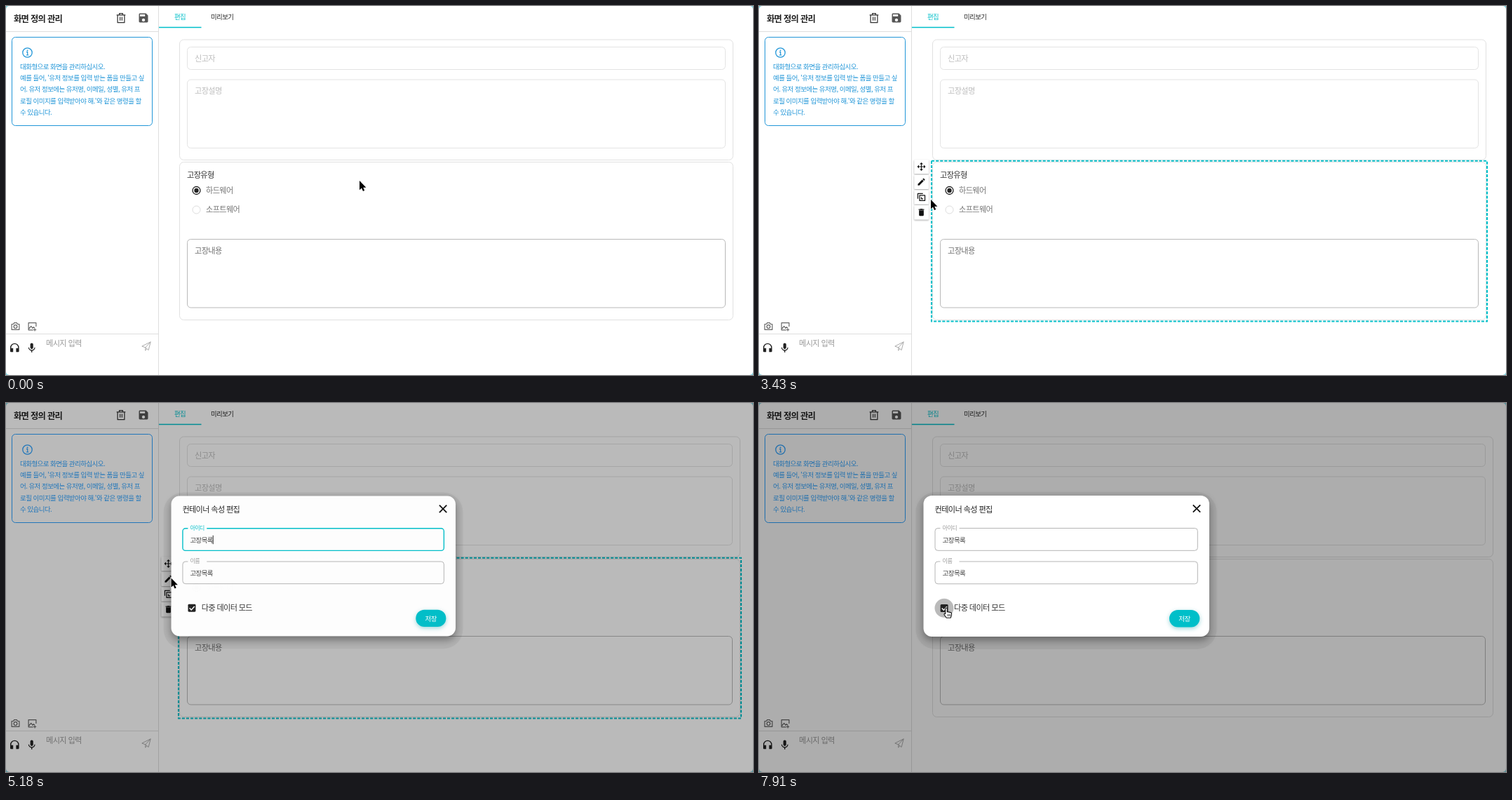
Recreate the animation shown at these times as an HTML page. Size 1065 by 526 pixels, loop 8000 ms.

```html
<!DOCTYPE html>
<html lang="ko">
<head>
<meta charset="utf-8">
<style>
  html, body { margin: 0; width: 100%; height: 100%; overflow: hidden; }
  svg { display: block; width: 100vw; height: 100vh; font-family: 'Noto Sans CJK KR', 'Noto Sans CJK', sans-serif; }
  text { letter-spacing: -.057em; white-space: pre; }
  .button { filter: drop-shadow(0 1px 1px rgba(0,0,0,.35)); }
  .panel { filter: drop-shadow(0 5px 6px rgba(0,0,0,.38)); }
  .save { filter: drop-shadow(0 2px 3px rgba(0,150,160,.4)); }
</style>
</head>
<body>
<svg id="stage" viewBox="0 0 1065 526" preserveAspectRatio="none"></svg>
<script>
const stage = document.getElementById('stage');
const LOOP = 8000, STEP = 70;
const TEAL = '#00bfc9', BLUE = '#2196d8', BRIGHT_BLUE = '#2ea2ff';

// Icons live on a 24-unit grid; those in `outlined` are stroked instead of filled.
const icons = {
  trash: 'M3 6h18M8.5 6V3h7v3M5 6v15.5h14V6M10 10v7.5M14 10v7.5',
  disk: 'M17 3H5c-1.1 0-2 .9-2 2v14c0 1.1.9 2 2 2h14c1.1 0 2-.9 2-2V7l-4-4zm-5 16c-1.66 0-3-1.34-3-3s1.34-3 3-3 3 1.34 3 3-1.34 3-3 3zm3-10H5V5h10v4z',
  bin: 'M6 19c0 1.1.9 2 2 2h8c1.1 0 2-.9 2-2V7H6v12zM19 4h-3.5l-1-1h-5l-1 1H5v2h14V4z',
  pencil: 'M3 17.25V21h3.75L17.81 9.94l-3.75-3.75L3 17.25zM20.71 7.04c.39-.39.39-1.02 0-1.41l-2.34-2.34c-.39-.39-1.02-.39-1.41 0l-1.83 1.83 3.75 3.75 1.83-1.83z',
  move: 'M13 6v5h5V7.75L22.25 12 18 16.25V13h-5v5h3.25L12 22.25 7.75 18H11v-5H6v3.25L1.75 12 6 7.75V11h5V6H7.75L12 1.75 16.25 6z',
  mic: 'M12 14c1.66 0 3-1.34 3-3V5c0-1.66-1.34-3-3-3S9 3.34 9 5v6c0 1.66 1.34 3 3 3zm5.3-3c0 3-2.54 5.1-5.3 5.1S6.7 14 6.7 11H5c0 3.41 2.72 6.23 6 6.72V21h2v-3.28c3.28-.48 6-3.3 6-6.72z',
  phones: 'M12 3a9 9 0 0 0-9 9v7c0 1.1.9 2 2 2h4v-8H5v-1a7 7 0 0 1 14 0v1h-4v8h4c1.1 0 2-.9 2-2v-7a9 9 0 0 0-9-9z',
  copy: 'M16 3H3v13M7.5 7.5H21V21H7.5zM12 12v4.5h4.5',
  camera: 'M3 7h4l2-3h6l2 3h4v13H3zM16 13a4 4 0 1 1-8 0 4 4 0 0 1 8 0z',
  picture: 'M21 12V3H3v17h11M4 17l5-6 4 5 2-3 3 3M18 16v7M14.5 19.5h7',
  plane: 'M2 12L22 2 17 21 10 15zM10 15v7l3-4M22 2L10 15'
};
const outlined = ['trash', 'copy', 'camera', 'picture', 'plane'];

const icon = (name, cx, cy, scale, color, weight = 2) => {
  const paint = outlined.includes(name)
    ? `fill="none" stroke="${color}" stroke-width="${weight}" stroke-linejoin="round"` : `fill="${color}"`;
  return `<path d="${icons[name]}" ${paint} transform="translate(${cx} ${cy}) scale(${scale}) translate(-12 -12)"/>`;
};
const label = (x, cy, str, size, color, weight = 400) =>
  `<text x="${x}" y="${cy + size * .37}" font-size="${size}" fill="${color}" font-weight="${weight}">${str}</text>`;
const box = (x1, y1, x2, y2, r, stroke, width = 1, fill = 'none', extra = '') =>
  `<rect x="${x1}" y="${y1}" width="${x2 - x1}" height="${y2 - y1}" rx="${r}" fill="${fill}" stroke="${stroke}" stroke-width="${width}" ${extra}/>`;
const line = (d, color, width = 1) => `<path d="${d}" fill="none" stroke="${color}" stroke-width="${width}"/>`;
const dot = (x, y, r, fill, stroke = 'none', width = 1) =>
  `<circle cx="${x}" cy="${y}" r="${r}" fill="${fill}" stroke="${stroke}" stroke-width="${width}"/>`;

// Linear interpolation over keys of the form [time, ...values].
function at(t, keys) {
  const i = keys.findIndex(k => k[0] > t);
  if (i === 0) return keys[0].slice(1);
  if (i < 0) return keys[keys.length - 1].slice(1);
  const a = keys[i - 1], b = keys[i], p = (t - a[0]) / (b[0] - a[0]);
  return a.slice(1).map((v, j) => v + (b[j + 1] - v) * p);
}

const pointerKeys = [
  [140, 504, 249], [560, 338, 270], [700, 338, 270], [910, 282, 270], [980, 282, 270],
  [1400, 282, 263], [1820, 282, 263], [2030, 254, 270], [2170, 254, 272], [2310, 254, 272],
  [2450, 253, 275], [2800, 245, 276], [3920, 245, 276], [4200, 235.5, 249.5], [5600, 235.5, 249.5],
  [5950, 262, 260], [6230, 285, 292], [6440, 283, 297], [6580, 276.5, 293.5],
  [6720, 269, 295], [6790, 269, 295], [6860, 267, 292]
];
// time, dim, dialog opacity, dialog scale
const openKeys = [[5040, 0, 0, .93], [5110, .15, .85, .978], [5180, .27, .985, .995], [5250, .31, 1, 1], [5390, .32, 1, 1]];
const rippleKeys = [[7000, 0], [7140, .27], [7280, .27], [7350, .12], [7490, .12], [7560, .27]];

function sidebar(blue) {
  const help = ['대화형으로 화면을 관리하십시오.', "예를 들어, '유저 정보를 입력 받는 폼을 만들고 싶",
    '어. 유저 정보에는 유저명, 이메일, 성별, 유저 프', "로필 이미지를 입력받아야 해.'와 같은 명령을 할", '수 있습니다.'];
  return line('M217.5 0V526M0 36.5H217M0 467.5H217', '#dedede')
    + label(11, 18, '화면 정의 관리', 12.3, '#222', 600)
    + icon('trash', 164, 17, .7, '#333', 1.8) + icon('disk', 196, 17, .72, '#555')
    + box(8.5, 44.5, 208.5, 170.5, 5, blue)
    + dot(30.5, 66.5, 6.7, 'none', blue, 1.3) + dot(30.5, 63.4, 1, blue)
    + line('M29 65.7h1.7v4M28.8 70h3.6', blue, 1.2)
    + help.map((s, i) => label(20, 86 + i * 16.35, s, 9.5, blue)).join('')
    + icon('camera', 13.5, 456.5, .6, '#666') + icon('picture', 37.5, 457, .6, '#666')
    + icon('phones', 12.3, 487, .7, '#222') + icon('mic', 36.7, 487.5, .7, '#222')
    + label(57, 481, '메시지 입력', 11.2, '#999') + icon('plane', 200, 485, .62, '#aaa', 1.6);
}

function form(wide) {
  const inner = 1025.5 + wide, outer = 1036.5 + wide;
  return label(240, 15.5, '편집', 9.4, TEAL, 500) + label(292, 15.5, '미리보기', 9.4, '#222', 500)
    + line('M218 30.5H278.5', TEAL, 1.4)
    + box(247.5, 48, outer, 219.5, 6, '#e1e1e1') + box(247.5, 222.5, outer, 447.5, 6, '#e1e1e1')
    + box(258.5, 58.5, inner, 90.5, 5, '#e3e3e3') + label(269, 74.5, '신고자', 11.2, '#bdbdbd')
    + box(258.5, 105, inner, 202.5, 5, '#e3e3e3') + label(269, 121, '고장설명', 11.2, '#bdbdbd')
    + label(258, 241, '고장유형', 11.2, '#333')
    + dot(271.5, 263, 5.5, 'none', '#222', 1.3) + dot(271.5, 263, 3.2, '#222') + label(285, 263, '하드웨어', 11.2, '#777')
    + dot(271.5, 290.5, 5.5, 'none', '#dcdcdc') + label(285, 290, '소프트웨어', 11.2, '#777')
    + box(258.5, 332.5, inner, 430, 5, '#b9b9b9') + label(269, 348.5, '고장내용', 11.2, '#707070');
}

function componentBar() {
  return box(254.5, 210, 1029.5, 322.5, 2, TEAL, 1.6)
    + `<path d="M253.5 230V213a4 4 0 0 1 4-4H1026a4 4 0 0 1 4 4V230z" fill="${TEAL}"/>`
    + icon('move', 954, 220, .68, '#fff') + icon('pencil', 974, 220, .57, '#fff')
    + icon('copy', 997, 220, .58, '#fff') + icon('bin', 1020, 220, .6, '#fff');
}

function sideButtons(hover) {
  return ['move', 'pencil', 'copy', 'bin'].map((name, i) => {
    const y = 229 + i * 21.7, fill = hover && name === 'pencil' ? '#d3f1f5' : '#fff';
    return box(221.3, y - 10, 242, y + 10.3, 1, 'none', 0, fill, 'class="button"')
      + icon(name, 231.5, y, name === 'move' ? .58 : .56, '#111', 2.2);
  }).join('');
}

function field(y, title, color, width, titleColor) {
  return box(251, y, 625.3, y + 31.8, 4, color, width)
    + `<rect x="258.5" y="${y - 3}" width="27" height="6" fill="#fff"/>`
    + label(261.5, y - .5, title, 8, titleColor) + label(261.5, y + 16.5, '고장목록', 9.5, '#444');
}

function dialog(t, [px, py], opacity, scale) {
  const focused = t < 7070, checked = t < 7280 || t >= 7490;
  const caret = focused && Math.floor((t - 5030) / 500) % 2 === 0;
  const hoverName = px > 251 && px < 626 && py > 226 && py < 258;
  return `<g opacity="${opacity}" transform="translate(438 232.5) scale(${scale}) translate(-438 -232.5)">`
    + box(223.5, 127, 652.5, 351, 28, 'none', 0, 'rgba(0,0,0,.05)')
    + box(234.5, 132, 642, 333, 12, 'none', 0, '#fff', 'class="panel"')
    + label(250.5, 151.5, '컨테이너 속성 편집', 11.2, '#222')
    + line('M618.8 145.3l10.4 10.4M629.2 145.3l-10.4 10.4', '#111', 1.8)
    + field(178.5, '아이디', focused ? TEAL : '#b5b5b5', focused ? 1.4 : 1, focused ? TEAL : '#999')
    + field(226, '이름', hoverName ? '#333' : '#b5b5b5', 1, '#999')
    + (caret ? line('M294.5 188.5V201', '#222') : '')
    + dot(264, 292.3, 13.5, `rgba(0,0,0,${at(t, rippleKeys)[0]})`)
    + (checked
      ? box(258.6, 287, 269.6, 298, 1.5, 'none', 0, '#222') + line('M260.7 292.6l2.6 2.6 4.6-5', '#fff', 1.4)
      : box(259.3, 287.7, 268.9, 297.3, 1, '#555', 1.3))
    + label(278, 292, '다중 데이터 모드', 11.2, '#333')
    + box(585, 295, 628.3, 319.5, 12.2, 'none', 0, TEAL, 'class="save"')
    + label(598.3, 307.5, '저장', 9.5, '#fff') + '</g>';
}

function pointer(t, [x, y]) {
  const hand = t > 5700 && y > 283;
  const shape = hand
    ? '<path d="M-1.3 1.3a1.3 1.3 0 0 1 2.6 0V6l1-.6 1.2.9 1.2-.4 1 .9 1-.2.8 1v3l-1.3 3.6h-6l-3-4.2c-.9-1.4.6-2.4 1.5-1.4z" fill="#fff" stroke="#111" stroke-width="1.1" stroke-linejoin="round"/><path d="M2 9v3M3.8 9v3M5.5 9v3" stroke="#111" stroke-width=".7"/>'
    : '<path d="M0 0v13.2l3-2.7 2 4.6 2.2-1-2-4.4h4.2z" fill="#000" stroke="#fff" stroke-width="1.6" paint-order="stroke" stroke-linejoin="round"/>';
  return `<g transform="translate(${x} ${y})">${shape}</g>`;
}

function scene(t) {
  const position = at(t, pointerKeys), [dim, opacity, scale] = at(t, openKeys);
  const wide = t >= 5110 ? 10 : 0;
  let out = '<rect width="1065" height="526" fill="#86d5e0"/>' + box(0, 0, 1065, 526, 5, 'none', 0, '#fff')
    + sidebar(dim ? BRIGHT_BLUE : BLUE) + form(wide);
  if (t >= 1960 && t < 7070) out += box(246, 220.7, 1038 + wide, 449.5, 0, TEAL, 2.1, 'none', 'stroke-dasharray="4.1 2"');
  if (t >= 1960 && t < 2590) out += componentBar();
  if (t >= 3430 && t < 7070) out += sideButtons(t >= 4060 && t < 5110);
  if (dim) out += `<rect width="1065" height="526" fill="#000" opacity="${dim}"/>`;
  if (opacity) out += dialog(t, position, opacity, scale);
  return out + pointer(t, position);
}

let shown = -1;
function tick() {
  const t = Math.floor(performance.now() % LOOP / STEP) * STEP;
  if (t !== shown) stage.innerHTML = scene(shown = t);
  requestAnimationFrame(tick);
}
tick();
</script>
</body>
</html>
```
